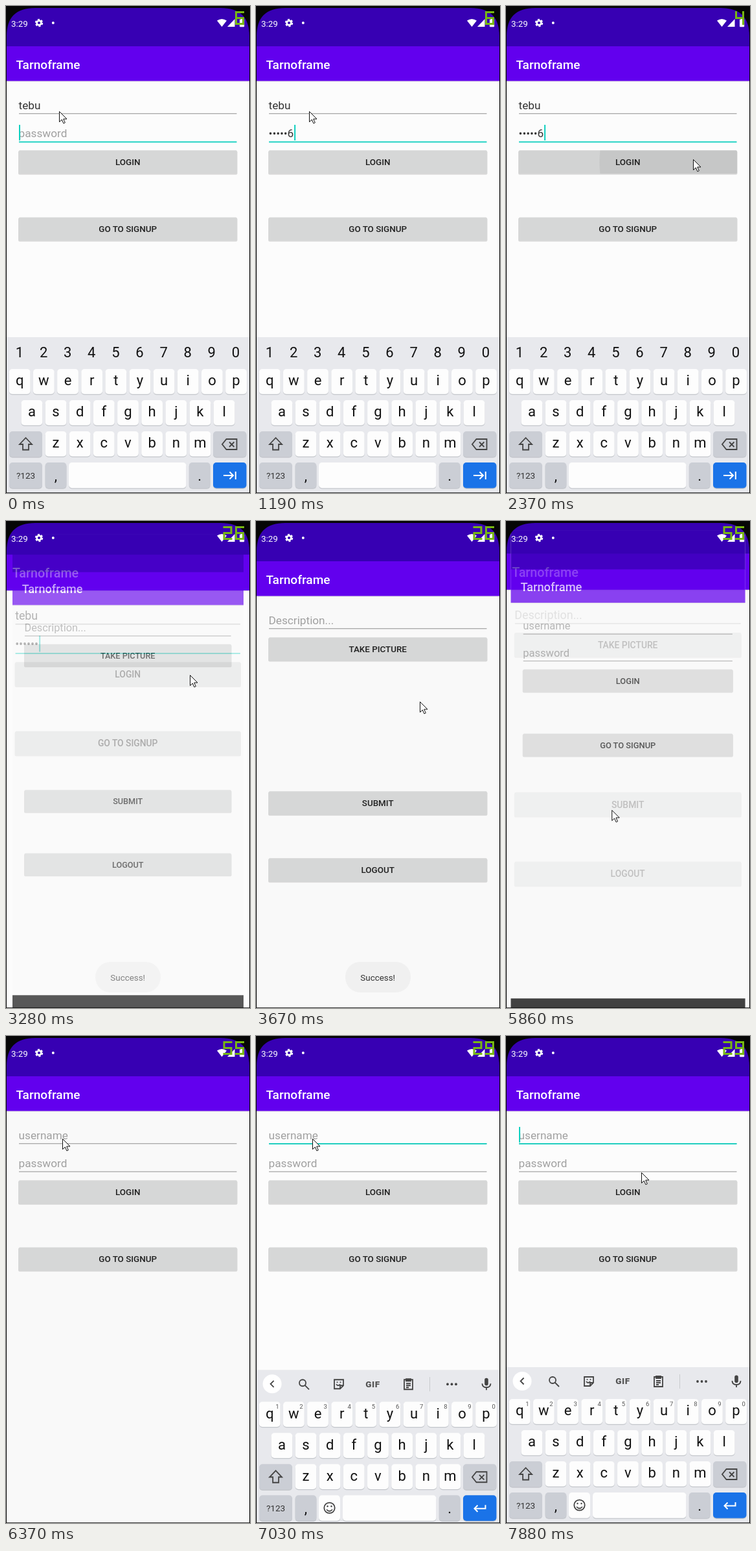
Recreate the animation shown at these times as an HTML page. Size 377 by 750 pixels, loop 8000 ms.

```html
<!DOCTYPE html>
<html lang="en">
<head>
<meta charset="utf-8">
<title>Login flow</title>
<style>
  html, body { margin: 0; height: 100%; overflow: hidden; background: #000; }
  svg { display: block; width: 100vw; height: 100vh; font-family: Roboto, Arial, sans-serif; }
  .title { font-size: 19.1px; font-weight: 500; fill: #fff; }
  .input { font-size: 17.2px; fill: #333; }
  .hint { font-size: 17.2px; fill: #a0a0a0; }
  .label { font-size: 13.4px; font-weight: 500; fill: #202020; text-anchor: middle; }
  .small { font-size: 13.4px; }
  .key { font-size: 22px; fill: #111; text-anchor: middle; }
  .sup { font-size: 9.5px; fill: #555; text-anchor: middle; }
  .line { fill: none; stroke: #444; stroke-width: 1.8; }
</style>
</head>
<body>
<svg id="stage" viewBox="0 0 377 750" preserveAspectRatio="none"></svg>
<script>
const LOOP = 8000;
const TEAL = '#0fd0bf';

// Moments at which the picture refreshes
const STEPS = [0,
  430, 580, 730, 880, 1040, 1190,
  1590, 1710, 1830, 1960, 2110, 2230, 2370, 2490, 2640,
  3160, 3280, 3400, 3520, 3670, 3790, 3910, 4030, 4180,
  4300, 4420, 4570, 4690, 4810, 4960, 5110, 5260,
  5410, 5530, 5650, 5800, 5920, 6070, 6220, 6370,
  6490, 6610, 6760, 6880, 7030, 7180, 7460, 7580, 7730, 7880];
const TYPED = STEPS.slice(1, 7);
const SECRET = '123456';
const COUNTER = [[0, '6'], [1960, '4'], [3160, '26'], [4570, '20'], [5650, '55'], [6760, '29']];
const POINTER = [[0, 82, 162], [1480, 82, 162], [2110, 289, 236], [3160, 289, 236],
  [3280, 284, 237], [3670, 253, 278], [4180, 224, 410], [4810, 188, 536],
  [5650, 188, 536], [6220, 94, 190], [6370, 87, 158], [7340, 87, 158], [7880, 209, 210]];

// ---- drawing helpers ----
const rect = (x, y, w, h, fill, more = '') =>
  `<rect x="${x}" y="${y}" width="${w}" height="${h}" fill="${fill}" ${more}/>`;
const text = (x, y, cls, s, more = '') => `<text x="${x}" y="${y}" class="${cls}" ${more}>${s}</text>`;
const path = (d, more = 'class="line"') => `<path d="${d}" ${more}/>`;
const circle = (x, y, r, more) => `<circle cx="${x}" cy="${y}" r="${r}" ${more}/>`;

function button(y, label, id) {
  const ripple = id ? `<g id="${id}" clip-path="url(#${id}Clip)">
    ${rect(19.5, y, 337.5, 36, '#000', 'opacity=".02"')}
    <circle id="${id}Wave" cy="${y + 18}" opacity=".06"/></g>
    <clipPath id="${id}Clip">${rect(19.5, y, 337.5, 36, '#000', 'rx="2"')}</clipPath>` : '';
  return rect(19, y + 1, 338.5, 36.4, '#000', 'rx="2" opacity=".14"') +
    rect(19.5, y, 337.5, 35.6, '#d6d7d7', 'rx="2"') + ripple + text(188.2, y + 23, 'label', label);
}

const underline = y => rect(20, y, 336.5, 1.1, '#9a9a9a');
const focusLine = y => rect(20, y - .3, 336.5, 1.8, TEAL);
const caret = (id, y) => rect(20, y, 2, 24, TEAL, `id="${id}"`);

const screen = (id, bg, body) => `<g id="${id}">
  ${rect(0, 0, 377, 750, bg, `id="${id}Bg"`)}${rect(0, 750, 377, 60, '#000')}
  ${rect(0, 115, 377, 2, '#000', 'opacity=".07"')}
  ${rect(0, 0, 377, 62.5, '#3700b3')}${rect(0, 62, 377, 53.5, '#6200ee')}
  ${text(15.6, 96.5, 'title', 'Tarnoframe')}${body}</g>`;

const loginButtons = id => button(222.3, 'LOGIN', id) + button(325.4, 'GO TO SIGNUP');

const loginScreen = screen('login', '#fcfcfc',
  text(19.6, 158.8, 'input', 'tebu') + underline(165.2) +
  text(19.6, 202, 'hint', 'password', 'id="secretHint"') +
  text(19.6, 202, 'input', '', 'id="secret"') + focusLine(208.8) +
  caret('secretCaret', 183) + loginButtons('loginTap'));

const composeScreen = screen('compose', '#f9f9f9',
  text(19.6, 158.8, 'hint', 'Description...') + underline(165.2) +
  button(179.2, 'TAKE PICTURE') + button(416.3, 'SUBMIT') + button(519.3, 'LOGOUT', 'logoutTap'));

const returnScreen = screen('again', '#f9f9f9',
  text(19.6, 158.8, 'hint', 'username') + underline(165.2) +
  `<g id="nameFocus">${focusLine(165.4)}</g>` + caret('nameCaret', 140) +
  text(19.6, 202, 'hint', 'password') + underline(208.4) + loginButtons(''));

// ---- keyboards ----
const key = (x, y, w, fill = '#fdfdfd', h = 39.5) =>
  rect(x, y + 1.2, w, h, '#c3c6cb', 'rx="5"') + rect(x, y, w, h, fill, 'rx="5"');

const row = (letters, x0, y, sups) => [...letters].map((c, i) => {
  const x = x0 + i * 37.15;
  return key(x, y, 32.8, '#fdfdfd', 38.8) + text(x + 16.4, y + 25.3, 'key', c) +
    (sups ? text(x + 28, y + 11, 'sup', (i + 1) % 10) : '');
}).join('');

const numbers = [...'1234567890'].map((c, i) => text(21 + i * 37.1, 540.5, 'key', c)).join('');

const toolbar = circle(25, 531.5, 14.5, 'fill="#fff"') + path('M27.5 526.5l-5 5 5 5') +
  circle(72, 530, 5, 'class="line"') + path('M75.5 533.5l6.5 6.5') +
  path('M121 525h14v9l-5 5h-9zM130 539v-5h5M124 532q3 4 6 0') +
  circle(125.5, 529, 1, 'fill="#444"') + circle(130.5, 529, 1, 'fill="#444"') +
  text(180.5, 536.3, '', 'GIF', 'text-anchor="middle" font-size="13.5" font-weight="800" fill="#555" letter-spacing=".6"') +
  path('M229 525h13v15h-13zM232 524h7v3h-7zM232 531h7M232 534h7M232 537h4') +
  rect(268, 521, 1, 22, '#c8cacd') +
  [296, 302.5, 309].map(x => circle(x, 532, 1.9, 'fill="#444"')).join('') +
  rect(353.2, 522.5, 5.6, 11.5, '#444', 'rx="2.8"') + path('M349.5 531q0 6 6.5 6t6.5 -6M356 537v4');

function keyboard(id, full) {
  const grey = '#cbced5';
  const spaceX = full ? 134 : 97;
  return `<g id="${id}">${rect(0, 510, 377, 245, '#e8e9ed')}` +
    (full ? toolbar : numbers) +
    row('qwertyuiop', 4.8, 559, full) + row('asdfghjkl', 23.5, 607) + row('zxcvbnm', 60.6, 655) +
    key(5, 655, 51, grey) + path('M30.5 665l9.5 10h-5v8.500h-9v-8.500h-5z') +
    key(320, 655, 51.5, grey) + path('M340.500 667h16v16h-16l-6.500 -8zM345 671.500l7.500 7.500m0 -7.500l-7.500 7.500') +
    key(5, 703, 51, grey) + text(30.5, 728, '', '?123', 'text-anchor="middle" font-size="13.5" fill="#333"') +
    key(60.6, 703, 32.8, grey) + text(77, 731, 'key', ',') +
    (full ? key(97, 703, 33, '#fdfdfd') + circle(113.5, 722.5, 8.2, 'class="line"') +
      circle(110.5, 720, 1.2, 'fill="#444"') + circle(116.5, 720, 1.2, 'fill="#444"') +
      path('M109 725q4.500 5 9 0') : '') +
    key(spaceX, 703, 278.5 - spaceX, '#fdfdfd') +
    key(282.8, 703, 32.8, grey) + text(299.2, 731, 'key', '.') +
    key(320, 703, 51.5, '#1a73e8') +
    path(full ? 'M354.500 718v5.500h-17m5 -5l-5 5 5 5' : 'M336 723h15m-5.500 -5.500l5.500 5.500 -5.500 5.500M354.800 717v12',
      'fill="none" stroke="#fff" stroke-width="2"') + '</g>';
}

// ---- system layer ----
const statusBar = text(8, 31.5, 'small', '3:29', 'fill="#fff"') +
  circle(51, 26, 3.4, 'fill="none" stroke="#fff" stroke-width="2.6"') +
  circle(51, 26, 5.2, 'fill="none" stroke="#fff" stroke-width="2" stroke-dasharray="3 2.445"') +
  circle(72.8, 26, 2, 'fill="#fff"') +
  path('M326 22.500q7.500 -5 15 0l-7.500 9.500z', 'fill="#fff"') +
  path('M353.500 20v12h-11.500z', 'fill="#fff"') +
  rect(361, 20.5, 7.2, 11.8, '#fff', 'rx="1"') + rect(363, 19, 3.2, 2, '#fff');

const toast = `<g id="toast">${rect(138, 679, 101, 47, '#f0f0f0', 'rx="23"')}
  ${text(188.2, 708, 'small', 'Success!', 'text-anchor="middle" fill="#333"')}</g>`;

const bezel = path('M0 0H377V750H0zM1 749.200V46Q1 3 45 3H332Q376 3 376 46V749.200z', 'fill-rule="evenodd" fill="#060606"');

document.getElementById('stage').innerHTML = rect(0, 0, 377, 750, '#000') +
  loginScreen + composeScreen + returnScreen +
  keyboard('numPad', false) + keyboard('fullPad', true) + toast + statusBar + bezel +
  '<path id="counter" fill="none" stroke="#78b813" stroke-width="3" stroke-linecap="square"/>' +
  '<path id="pointer" d="M.5 .5V16.500L4.300 13 6.900 18.800 9.300 17.700 6.700 12H12z" fill="#fff" stroke="#111"/>';

// ---- time helpers ----
const $ = id => document.getElementById(id);
const set = (id, attrs) => { for (const k in attrs) $(id).setAttribute(k, attrs[k]); };
const show = (id, on) => set(id, { visibility: on ? 'visible' : 'hidden' });
const clamp = v => Math.max(0, Math.min(1, v));
const easeOut = u => 1 - (1 - clamp(u)) ** 2;
const latest = (list, t) => list.filter(e => e[0] <= t).pop();

function along(track, t) {
  const i = track.findIndex(p => p[0] > t);
  if (i < 0) return track[track.length - 1].slice(1);
  const [t0, x0, y0] = track[i - 1], [t1, x1, y1] = track[i];
  const u = (t - t0) / (t1 - t0);
  return [x0 + (x1 - x0) * u, y0 + (y1 - y0) * u];
}

const zoom = s => `translate(188.5 378) scale(${s}) translate(-188.5 -378)`;

function openScreen(from, to, p) {
  set(from, { transform: zoom(1 + .05 * p) });
  set(to, { transform: zoom(.85 + .15 * p), opacity: p });
  show(from, p < 1);
  show(to, p > 0);
}

function ripple(id, x, age, life) {
  const on = age > 0 && age < life;
  set(id, { display: on ? 'inline' : 'none', opacity: age > life * .7 ? .6 : 1 });
  set(id + 'Wave', { cx: x, r: Math.max(0, age) * .56 });
}

const SEGMENTS = { a: 'M1.500 9.500h11', b: 'M12.500 9.500v9', c: 'M12.500 18.500v9', d: 'M1.500 27.500h11',
  e: 'M1.500 18.500v9', f: 'M1.500 9.500v9', g: 'M1.500 18.500h11' };
const DIGITS = { 0: 'abcdef', 2: 'abged', 4: 'fgbc', 5: 'afgcd', 6: 'afgedc', 9: 'abfgcd' };

function counterPath(s) {
  return [...s].map((c, i) => {
    const x = 354 - 18.5 * (s.length - 1 - i);
    return [...DIGITS[c]].map(k => SEGMENTS[k].replace(/M([\d.]+)/, (_, n) => 'M' + (x + +n))).join('');
  }).join('');
}

function render(time) {
  const t = STEPS.filter(s => s <= time).pop();

  // password typing: the newest character stays readable for a while
  const n = TYPED.filter(s => s <= t).length;
  const last = n ? TYPED[n - 1] : 0;
  const open = n > 0 && t - last < 1440;
  $('secret').textContent = '•'.repeat(open ? n - 1 : n) + (open ? SECRET[n - 1] : '');
  show('secretHint', n === 0);
  set('secretCaret', { x: 20 + (open ? (n - 1) * 5.9 + 9.6 : n * 5.9),
    opacity: (t - last + 60) % 1000 < 500 ? 1 : 0 });

  // screens
  const p1 = easeOut((t - 3130) / 370), p2 = easeOut((t - 5620) / 370);
  openScreen('login', 'compose', p1);
  if (p1 === 1) openScreen('compose', 'again', p2);
  else show('again', false);
  for (const id of ['secret', 'secretHint', 'secretCaret'])
    if (p1 === 1) show(id, false);
  if (p1 < 1) { show('secret', true); $('secretCaret').removeAttribute('visibility'); }
  if (p1 < 1 && n) show('secretHint', false);
  if (n && p1 < 1) $('secret').removeAttribute('visibility');

  ripple('loginTap', 290, t - 2110, 500);
  ripple('logoutTap', 188, t - 5290, 400);

  // username focus
  const focused = t >= 6490;
  set('nameFocus', { display: focused ? 'inline' : 'none' });
  set('nameCaret', { display: focused && (t - 6490) % 1000 < 500 ? 'inline' : 'none' });
  set('againBg', { fill: t >= 6760 ? '#fcfcfc' : '#f9f9f9' });

  // keyboards and toast
  const down = clamp((t - 3100) / 150), up = easeOut((t - 6640) / 450);
  set('numPad', { transform: `translate(0 ${240 * down})`, opacity: 1 - down });
  set('fullPad', { transform: `translate(0 ${240 * (1 - up)})`, opacity: clamp(up * 2) });
  set('toast', { opacity: Math.min(clamp((t - 3130) / 250), clamp((5410 - t) / 250)) });

  set('counter', { d: counterPath(latest(COUNTER, t)[1]) });
  set('pointer', { transform: `translate(${along(POINTER, t)})` });
}

const start = performance.now();
function tick() {
  render((performance.now() - start) % LOOP);
  requestAnimationFrame(tick);
}
tick();
</script>
</body>
</html>
```
